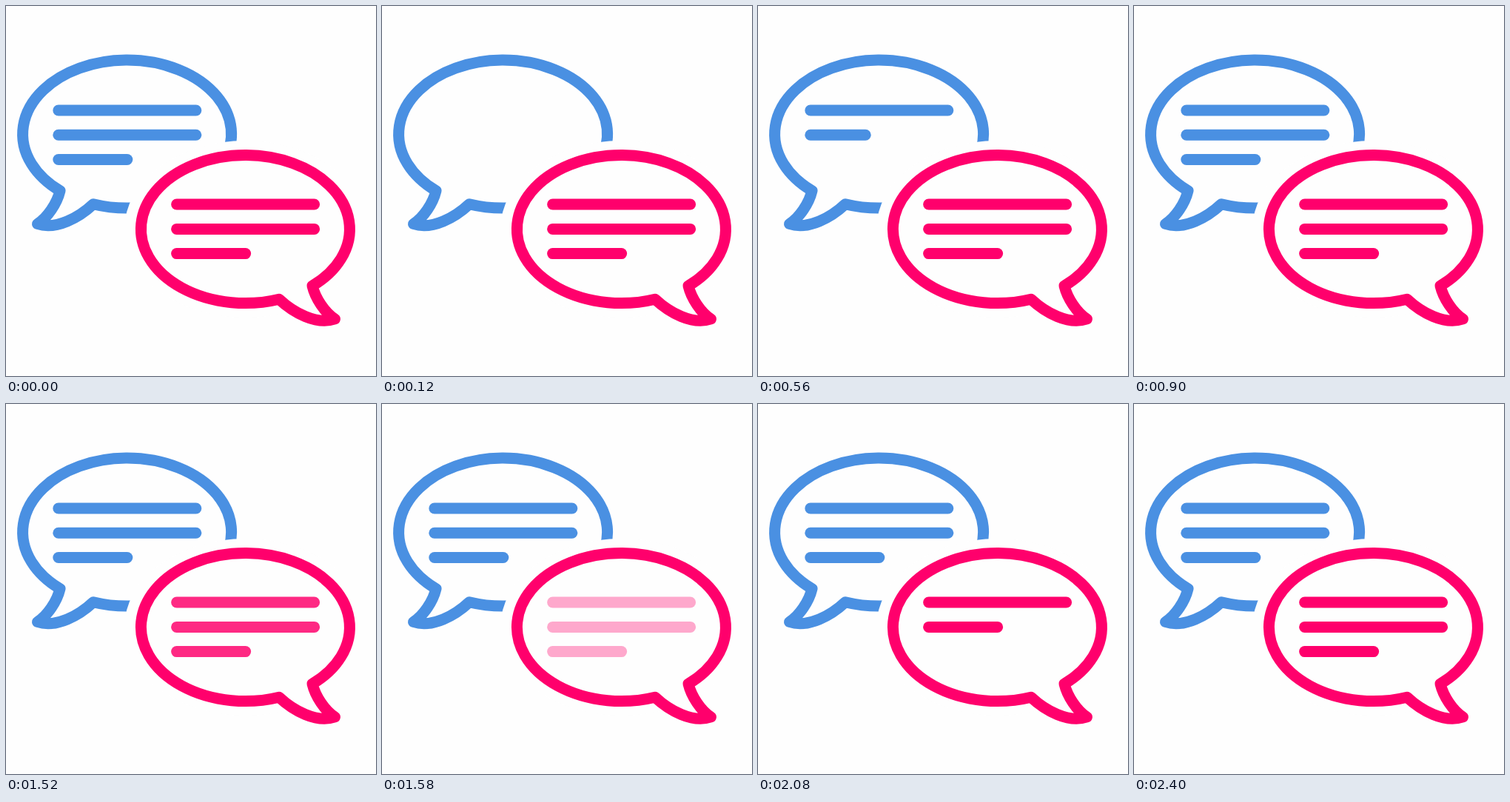
An HTML page for the animation above (3020 ms loop, 500 by 500 pixels).

```html
<!DOCTYPE html>
<html lang="en">
<head>
<meta charset="utf-8">
<title>Chat bubbles</title>
<style>
  html, body { margin: 0; width: 100%; height: 100%; overflow: hidden; background: #fefefe; }
  svg { display: block; width: 100vw; height: 100vh; }
  .stroke { fill: none; stroke-width: 15; stroke-linecap: round; stroke-linejoin: round; }
  .blue { stroke: #4a90e2; }
  .pink { stroke: #ff006c; }
</style>
</head>
<body>
<svg viewBox="0 0 500 500">
  <defs>
    <path id="bubble" d="M369 396.2 A141 100 0 1 1 414 378.2 C418 395 431 414.5 444.5 423 C419 431.5 388 414 369 396.2 Z"/>
  </defs>
  <use href="#bubble" class="stroke blue" transform="translate(487 -128.5) scale(-1 1)"/>
  <ellipse cx="323.5" cy="301.5" rx="163.5" ry="119.5" fill="#fefefe"/>
  <use href="#bubble" class="stroke pink"/>
  <g id="blueText" class="stroke blue"></g>
  <g id="pinkText" class="stroke pink"></g>
</svg>
<script>
const LOOP = 3020, TICK = 20, FADE = 120;
const LENGTH = 186, SPEED = LENGTH / 200;
const ROWS = [
  { start: 160, length: LENGTH },
  { start: 480, length: LENGTH },
  { start: 800, length: LENGTH / 2 }
];

function makeText(id, x, ys, delay) {
  const group = document.getElementById(id);
  const lines = ys.map(y => {
    const line = document.createElementNS("http://www.w3.org/2000/svg", "path");
    group.appendChild(line);
    return { line, y };
  });
  return time => {
    const t = time - delay;
    const fading = t < ROWS[0].start;
    group.setAttribute("opacity", fading ? Math.min(1, Math.max(0, 1 - t / FADE)) : 1);
    lines.forEach(({ line, y }, i) => {
      const { start, length } = ROWS[i];
      const drawn = fading ? length : Math.min(length, (t - start) * SPEED);
      line.setAttribute("d", drawn < 0 ? "" : `M${x} ${y}h${Math.max(drawn, 0.01)}`);
    });
  };
}

const texts = [
  makeText("blueText", 70.8, [141, 174.2, 207.5], 0),
  makeText("pinkText", 230.6, [268, 301.4, 334.6], 1500)
];

let origin = null;
function frame(now) {
  if (origin === null) origin = now;
  const elapsed = Math.max(0, now - origin) % LOOP;
  const time = Math.floor(elapsed / TICK + 0.001) * TICK;
  texts.forEach(draw => draw(time));
  requestAnimationFrame(frame);
}
texts.forEach(draw => draw(0));
requestAnimationFrame(frame);
</script>
</body>
</html>
```
